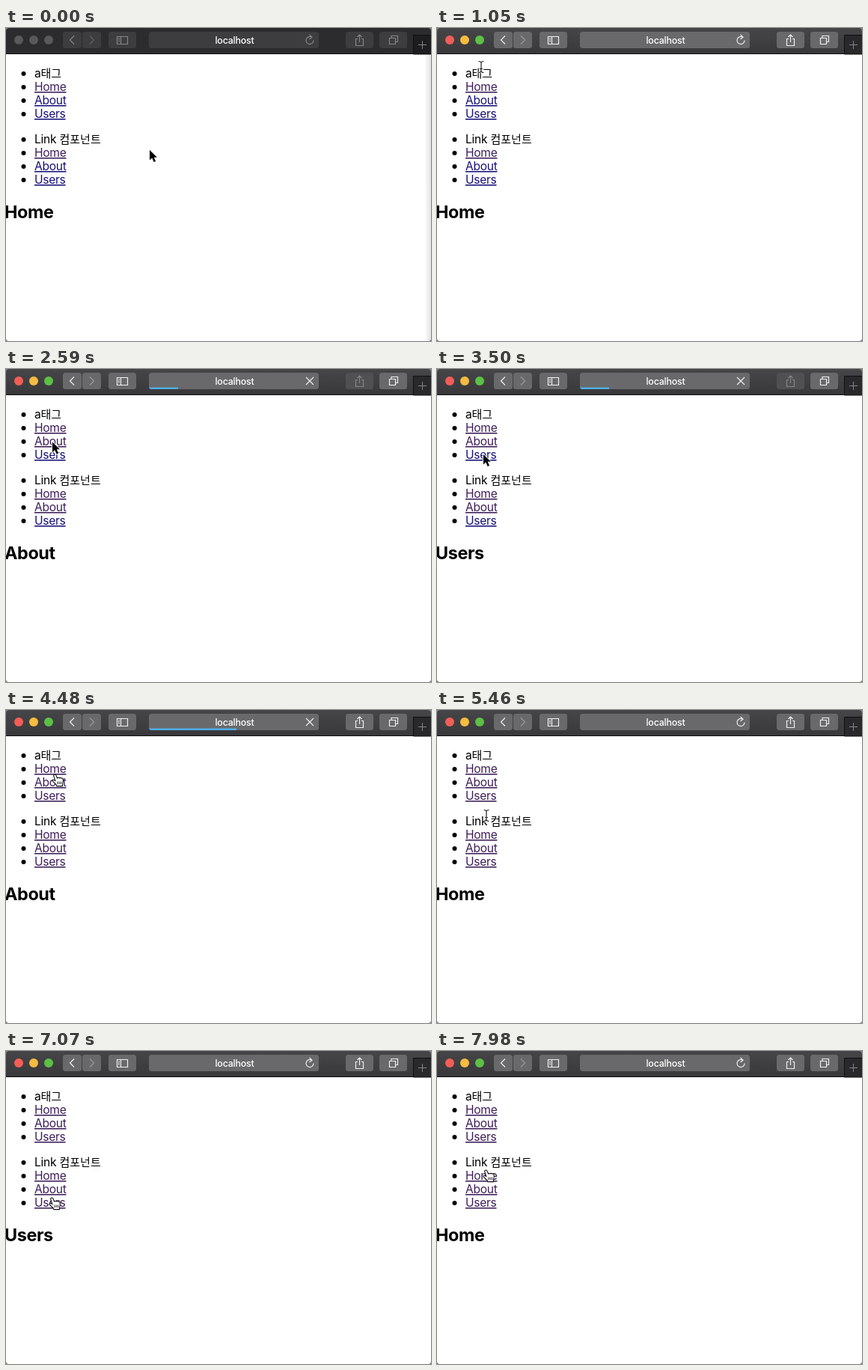
Write an HTML page that moves like this. It is 568x418 px and loops after 8 s.

```html
<!DOCTYPE html>
<html lang="ko">
<head>
<meta charset="utf-8">
<title>localhost</title>
<style>
  html, body { margin: 0; width: 568px; height: 418px; overflow: hidden; background: #777; }
  svg { display: block; font: 15.6px Inter, "Noto Sans CJK KR", "Noto Sans CJK", sans-serif; letter-spacing: -.3px; }
  .ko { font: 15px "Noto Sans CJK KR", "Noto Sans CJK", sans-serif; letter-spacing: 0; }
  .link { fill: #17107a; text-decoration: underline; text-decoration-thickness: 1px; }
  .link.seen { fill: #3d1d59; }
  #heading { font-size: 23.4px; font-weight: 700; letter-spacing: -.4px; }
  #address { font-size: 12.4px; font-weight: 500; letter-spacing: -.2px; text-anchor: middle; fill: #fff; }
  .button { fill: #69696b; }
  .icon { fill: none; stroke: #eee; stroke-width: 1.2; }
  .faint { stroke: #98989a; }
  .light { fill: var(--c); }
  .dim .button { fill: #505052; }
  .dim .icon { stroke: #858587; }
  .inactive .button { fill: #3d3d3f; }
  .inactive .icon { stroke: #858587; }
  .inactive .faint { stroke: #606062; }
  .inactive .light { fill: #59595b; }
  .inactive #bar { fill: #2c2c2e; }
  .inactive .newtab { fill: #1d1d1f; }
  .newtab { fill: #29292b; }
</style>
</head>
<body>
<svg id="stage" width="568" height="418">
  <defs>
    <linearGradient id="steel" x2="0" y2="1">
      <stop stop-color="#464648"/><stop offset="1" stop-color="#38383a"/>
    </linearGradient>
    <linearGradient id="edge">
      <stop stop-color="#fff"/><stop offset="1" stop-color="#e2e2e2"/>
    </linearGradient>
    <clipPath id="window"><rect width="568" height="418" rx="4"/></clipPath>
    <clipPath id="field"><rect x="191" y="5" width="227" height="22" rx="3.5"/></clipPath>
  </defs>
  <g clip-path="url(#window)">
    <rect width="568" height="418" fill="#fff"/>
    <rect id="shade" x="559" y="35" width="9" height="383" fill="url(#edge)"/>
    <g id="list"></g>
    <text id="heading" x="-2" y="254"></text>

    <g id="toolbar">
      <rect id="bar" width="568" height="35" fill="url(#steel)"/>
      <path d="M0 34.5H568" stroke="#111"/>
      <circle class="light" cx="17" cy="16" r="6" style="--c:#f25e57"/>
      <circle class="light" cx="37" cy="16" r="6" style="--c:#f6bb40"/>
      <circle class="light" cx="57" cy="16" r="6" style="--c:#5cc045"/>
      <rect class="button" x="76" y="5" width="25" height="22" rx="3.5"/>
      <path class="icon" stroke-width="1.6" d="M91 10.5L85.5 16L91 21.5"/>
      <rect class="button" x="102" y="5" width="25" height="22" rx="3.5"/>
      <path class="icon faint" d="M112 10.5L117.5 16L112 21.5"/>
      <rect class="button" x="137" y="5" width="37" height="22" rx="3.5"/>
      <path class="icon" d="M148.5 11.5H162.5V21.5H148.5ZM153.5 11.5V21.5M150 14H152M150 16H152M150 18H152"/>
      <rect class="button" x="191" y="5" width="227" height="22" rx="3.5"/>
      <rect id="progress" x="191" y="24.5" height="2.5" fill="#50aee8" clip-path="url(#field)"/>
      <text id="address" x="305.5" y="21">localhost</text>
      <path class="icon" id="reload" d="M408.5 12.2A5 5 0 1 0 411 16.5M405.5 9L409 12.2L405.5 15"/>
      <path class="icon" id="stop" d="M401 11L411 21M411 11L401 21"/>
      <g id="share">
        <rect class="button" x="454" y="5" width="37" height="22" rx="3.5"/>
        <path class="icon" d="M470 14.5H467.5V23.5H477.5V14.5H475M472.5 19V9M469.5 12L472.5 9L475.5 12"/>
      </g>
      <rect class="button" x="499" y="5" width="37" height="22" rx="3.5"/>
      <path class="icon" d="M512.5 13.5H520.5V21.5H512.5ZM515 13.5V10.5H523.5V18.5H520.5"/>
      <path class="newtab" d="M544.5 35V9.5H569V35Z" stroke="#101012"/>
      <path d="M551 22.5H562M556.5 17V28" stroke="#858587"/>
    </g>

    <g id="cursor">
      <path id="arrow" d="M0 0V13.6L3.2 10.6L5.6 16L8.1 15L5.7 9.7H9.9Z" stroke="#fff" paint-order="stroke" stroke-width="1.6"/>
      <g id="beam" fill="none">
        <path d="M-3.5 -7.5Q0 -7.5 0 -5V5Q0 7.5 -3.5 7.5M3.5 -7.5Q0 -7.5 0 -5V5Q0 7.5 3.5 7.5M-2 2.5H2" stroke="#fff" stroke-width="2.6"/>
        <path d="M-3.5 -7.5Q0 -7.5 0 -5V5Q0 7.5 -3.5 7.5M3.5 -7.5Q0 -7.5 0 -5V5Q0 7.5 3.5 7.5M-2 2.5H2" stroke="#222" stroke-width="1.2"/>
      </g>
      <g id="hand" fill="#fff" stroke="#111" stroke-width="1.1">
        <path d="M-2.4 1.4Q-1 -.9 .7 .7L2.6 5Q4 3.6 5.2 4.8Q6.6 3.8 7.6 5.1Q9.5 4.4 10 6.3Q11 9.2 9.6 12L9.4 15.6H1.8L1 13.5Q-2 11 -4 8.6Q-4.2 6.7 -2 7.4L-.2 8.5Z"/>
        <path d="M3 9.5V13M5.2 9.5V13M7.4 9.5V13" stroke-width=".9"/>
      </g>
    </g>
  </g>
</svg>
<script>
const $ = id => document.getElementById(id);
const LOOP = 8000, STEP = 70;

const headings = [[0, 'Home'], [2500, 'About'], [3430, 'Users'], [4300, 'About'], [5000, 'Home'],
  [6300, 'About'], [6800, 'Users'], [7490, 'About'], [7840, 'Home']];
// click, page swap, finished
const loads = [[1750, 2500, 2950], [3050, 3430, 3900], [4150, 4300, 4650], [4760, 5000, 5350]];
const visited = { Home: 0, About: 1780, Users: 3540 };
// time, x, y, shape
const moves = [
  [0, 192, 163, 'arrow'], [70, 192, 163, 'arrow'], [630, 62, 55, 'beam'], [770, 59, 52, 'beam'],
  [1050, 59, 52, 'beam'], [1330, 61, 76, 'hand'], [1610, 62, 97, 'hand'], [2500, 62, 97, 'arrow'],
  [2660, 62, 98, 'hand'], [2940, 62, 114, 'hand'], [3430, 62, 114, 'arrow'], [3920, 62, 114, 'hand'],
  [4130, 62, 98, 'hand'], [4270, 63, 97, 'hand'], [4480, 66, 86, 'hand'], [4690, 66, 78, 'hand'],
  [5000, 66, 78, 'arrow'], [5110, 66, 82, 'hand'], [5390, 66, 132, 'beam'], [5460, 66, 141, 'beam'],
  [5740, 66, 155, 'beam'], [5880, 66, 165, 'hand'], [6160, 65, 181, 'hand'], [6400, 65, 181, 'hand'],
  [6650, 62, 196, 'hand'], [7070, 62, 196, 'hand'], [7210, 63, 180, 'hand'], [7560, 63, 180, 'hand'],
  [7770, 66, 159, 'hand'], [8000, 66, 159, 'hand']];

function row(y, content) {
  return `<circle cx="23.5" cy="${y - 5}" r="3"/><text x="38" y="${y}" ${content}</text>`;
}
const titles = ['>a<tspan class="ko" x="46.5">태그</tspan>', '>Link <tspan class="ko" x="71.5">컴포넌트</tspan>'];
$('list').innerHTML = titles.map((title, i) => {
  const top = 66 + 88 * i;
  return row(top, title) + Object.keys(visited).map((name, k) =>
    row(top + 18 * (k + 1), `class="link" data-page="${name}">${name}`)).join('');
}).join('');
const links = document.querySelectorAll('.link');

const latest = (list, t) => list.findLast(item => item[0] <= t);
const show = (id, on) => $(id).style.display = on ? '' : 'none';

function progress(t, [click, swap, end]) {
  if (t < swap + 100) return 39 * Math.min(1, (t - click) / 100);
  return t < end - 150 ? 117 : 117 + 110 * (t - end + 150) / 150;
}

function draw(t) {
  const active = t >= 210;
  $('toolbar').classList.toggle('inactive', !active);
  show('shade', !active);
  $('heading').textContent = latest(headings, t)[1];
  for (const link of links) link.classList.toggle('seen', t >= visited[link.dataset.page]);

  const load = loads.find(([click, , end]) => t >= click && t < end);
  show('reload', !load);
  show('stop', load);
  $('progress').setAttribute('width', load ? progress(t, load) : 0);
  $('share').classList.toggle('dim', !!load && t >= load[1] && t < load[1] + 120);

  const from = latest(moves, t), to = moves[moves.indexOf(from) + 1];
  const p = (t - from[0]) / (to[0] - from[0]);
  const mix = i => from[i] + (to[i] - from[i]) * p;
  $('cursor').setAttribute('transform', `translate(${mix(1)} ${mix(2)})`);
  for (const shape of ['arrow', 'beam', 'hand']) show(shape, shape === from[3]);
}

const start = performance.now();
function tick() {
  const t = (performance.now() - start) % LOOP;
  draw(Math.floor(t / STEP) * STEP);
  requestAnimationFrame(tick);
}
tick();
</script>
</body>
</html>
```
